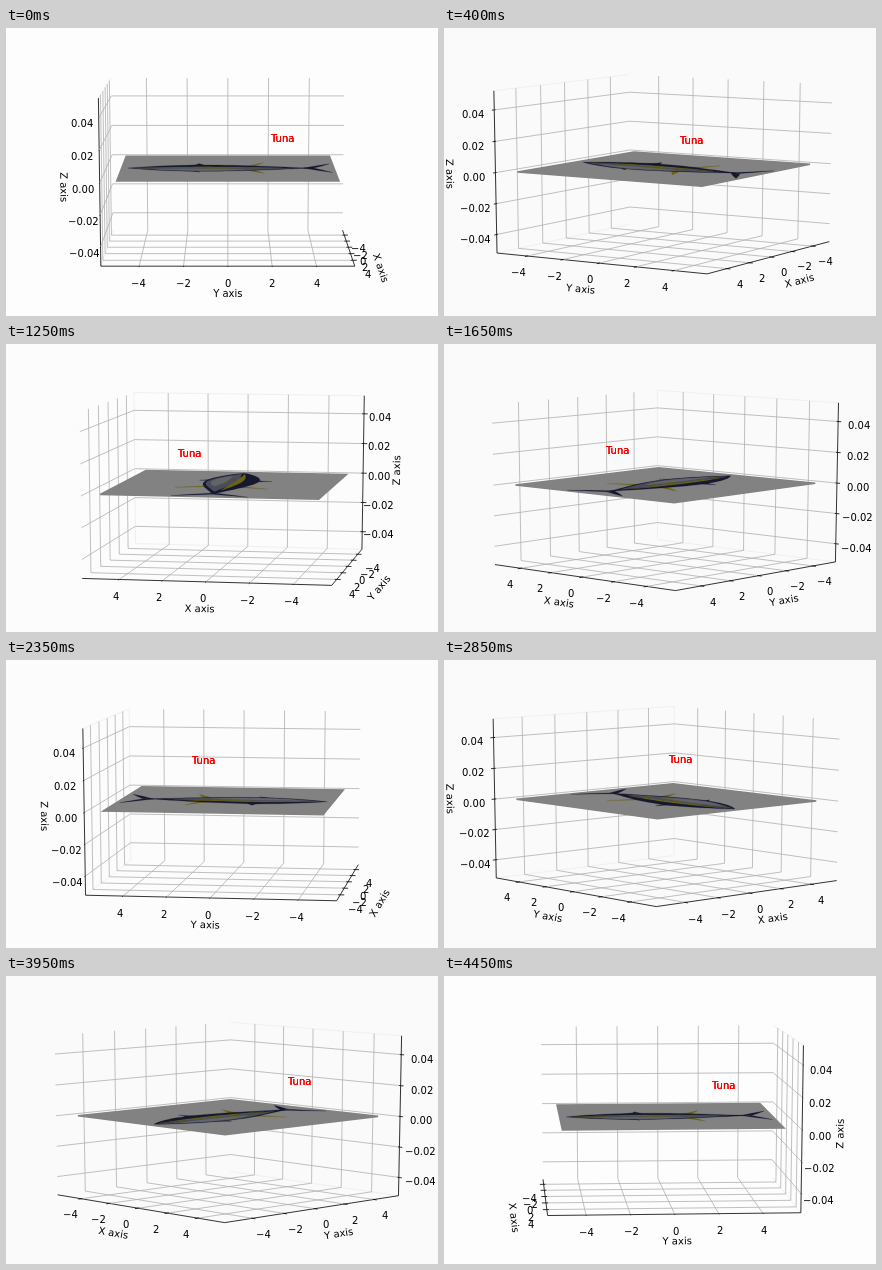
Animation of 432 by 288 pixels, one loop 4.5 s. Source, as an HTML page:

```html
<!DOCTYPE html>
<html lang="en">
<head>
<meta charset="utf-8">
<title>Rotating 3D plot</title>
<style>
html, body { margin: 0; width: 100%; height: 100%; overflow: hidden; background: #fcfcfc; }
svg { display: block; width: 432px; height: 288px; overflow: hidden; }
text { font: 10px "DejaVu Sans", sans-serif; white-space: pre; }
</style>
</head>
<body>
<svg id="plot" viewBox="0 0 432 288" xmlns="http://www.w3.org/2000/svg"></svg>
<script>
const W = 432, H = 288, STEPS = 90, STEP_MS = 50;
const DIST = 10, ELEV = 10 * Math.PI / 180;
const DELTA = 1 / 12, EDGE = 0.5 + DELTA / 4;
const TICK_PAD = 11.5 / 15 * DELTA, LABEL_PAD = 25 / 15 * DELTA;
const SX = W / 0.185, SY = H / 0.185;
const CX = SX * 0.095, CY = H - SY * 0.095;
const NAVY = '#15182e', SLATE = '#4a4d58', PALE = '#62646c', OLIVE = '#6a6318';

const AXES = [
  { name: 'X axis', side: 1, span: 11, gap: 2, digits: 0 },
  { name: 'Y axis', side: 0, span: 11, gap: 2, digits: 0 },
  { name: 'Z axis', side: 0, span: 0.1, gap: 0.02, digits: 2 }
];

const svg = document.getElementById('plot');
const pen = document.createElement('canvas').getContext('2d');
pen.font = '10px "DejaVu Sans", sans-serif';
let ca = 1, sa = 0;

function project([x, y, z]) {
  const near = x * ca + y * sa;
  const right = y * ca - x * sa;
  const up = z * Math.cos(ELEV) - near * Math.sin(ELEV);
  const depth = DIST - near * Math.cos(ELEV) - z * Math.sin(ELEV);
  return [CX + SX * right / depth, CY - SY * up / depth];
}

const fix = p => p.map(v => v.toFixed(2)).join();
const path = pts => pts.map(p => fix(project(p))).join(' ');
const put = (p, i, v) => p.map((old, k) => k === i ? v : old);
const flip = (p, i) => put(p, i, -p[i]);
const outward = (p, skip, pad) => p.map((v, k) => k === skip ? v : v + (v < 0 ? -pad : pad));

const line = (pts, color, width = 0.8) =>
  `<polyline points="${path(pts)}" fill="none" stroke="${color}" stroke-width="${width}"/>`;

// Flat shape on the plane z = 0, in plot units
const shape = (color, pts, stroke = 0.2) =>
  `<polygon points="${path(pts.map(([x, y]) => [x / 11, y / 11, 0]))}" fill="${color}" stroke="${color}" stroke-width="${stroke}"/>`;

const label = (x, y, str, attrs = '') =>
  `<text x="${x.toFixed(2)}" y="${y.toFixed(2)}" ${attrs}>${str}</text>`;

function axis({ name, side, span, gap, digits }, i, far) {
  const a = flip(far, side), b = flip(a, i);
  const [p, q] = [project(a), project(b)];
  let out = line([a, b], '#000');

  // Axis title follows the slope of its line and never reads upside down
  let turn = Math.atan2(p[1] - q[1], q[0] - p[0]) * 180 / Math.PI;
  turn = (turn + 360) % 180;
  if (turn > 90) turn -= 180;
  const mid = project(outward(put(a, i, 0), i, LABEL_PAD));
  out += label(0, 2.7, name,
    `text-anchor="middle" transform="translate(${fix(mid)}) rotate(${(-turn).toFixed(2)})"`);

  const dir = Math.sign(a[side]) * DELTA;
  let marks = '';
  for (let k = -2; k <= 2; k++) {
    const s = k * gap / span, corner = put(far, i, s), at = put(a, i, s);
    out += line([flip(corner, (i + 1) % 3), corner, flip(corner, (i + 2) % 3)], '#b0b0b0');
    marks += line([put(at, side, a[side] - 0.1 * dir), put(at, side, a[side] + 0.2 * dir)], '#000');
    const str = (k * gap).toFixed(digits).replace('-', '\u2212');
    const [x, y] = project(outward(at, i, TICK_PAD));
    marks += label(Math.round(x - pen.measureText(str).width / 2), Math.round(y + 8), str);
  }
  return out + marks;
}

// Fish along y: nose at t = 0, tail root at t = 1
const bodyY = t => -4.7 + 8.5 * t;
const girth = t => 0.07 * t + 1.25 * Math.sin(Math.PI * t ** 0.8) ** 1.1;

// Strip of the body between two fractions of its half width
function band(color, lo, hi, t0 = 0, t1 = 1, n = 24) {
  const back = [], belly = [];
  for (let k = 0; k <= n; k++) {
    const t = t0 + (t1 - t0) * k / n;
    const fade = t0 > 0 ? Math.sin(Math.PI * k / n) ** 0.5 : 1;
    const mid = (lo + hi) / 2, half = (hi - lo) / 2 * fade;
    back.push([(mid - half) * girth(t), bodyY(t)]);
    belly.unshift([(mid + half) * girth(t), bodyY(t)]);
  }
  return shape(color, [...back, ...belly]);
}

// Swept fin: root centre, tip and root width
const fin = (color, x, y, tipX, tipY, w) => shape(color, [
  [x, y - w / 2], [x + (tipX - x) * 0.55, y + (tipY - y) * 0.4],
  [tipX, tipY], [x + (tipX - x) * 0.5, y + (tipY - y) * 0.5 + w * 0.3], [x, y + w / 2]
]);

function fish() {
  let out = fin(NAVY, -0.9, -1.5, -1.9, -1.4, 0.9) + fin(NAVY, 0.9, -1.8, 1.6, -1.3, 0.5);
  for (const side of [-1, 1]) {
    out += fin(OLIVE, side * 0.5, 0.9, side * 2.2, 1.7, 0.5);
    out += fin(NAVY, 0, 3.8, side * 1.75, 4.85, 0.5);
  }
  return out + band(NAVY, -1, 1) + band(SLATE, -0.25, 0.9, 0.03, 0.9) +
    band(PALE, 0.2, 0.75, 0.15, 0.65) + band(OLIVE, -0.4, -0.12, 0.05, 0.85) +
    fin(OLIVE, 0.15, -0.9, 0.45, 0.6, 0.3);
}

function draw(step) {
  const az = step * 2 * Math.PI / STEPS;
  ca = Math.cos(az);
  sa = Math.sin(az);
  const far = [ca < 0 ? EDGE : -EDGE, sa < -1e-9 ? EDGE : -EDGE, -EDGE];
  const shade = Math.round(253 - 3 * Math.abs(Math.sin(2 * az)));
  const square = (r, f) => [[-r, -r], [r, -r], [r, r], [-r, r]].map(f);
  const wall = square(EDGE, ([x, z]) => [x, far[1], z]);
  const [x, y] = project([2 / 11, 2 / 11, 0.2]).map(Math.round);

  svg.innerHTML =
    `<rect width="${W}" height="${H}" fill="rgb(${shade},${shade},${shade})"/>` +
    line(wall, '#f0f0f0', 1) +
    AXES.map((ax, i) => axis(ax, i, far)).join('') +
    shape('#828282', square(5, p => p), 1.6) +
    fish() +
    label(x, y, 'Tuna', 'fill="#f00"').repeat(3);
}

let shown = -1;
const start = performance.now();
function tick() {
  const step = Math.floor((performance.now() - start) / STEP_MS) % STEPS;
  if (step !== shown) draw(shown = step);
  requestAnimationFrame(tick);
}
tick();
</script>
</body>
</html>
```
